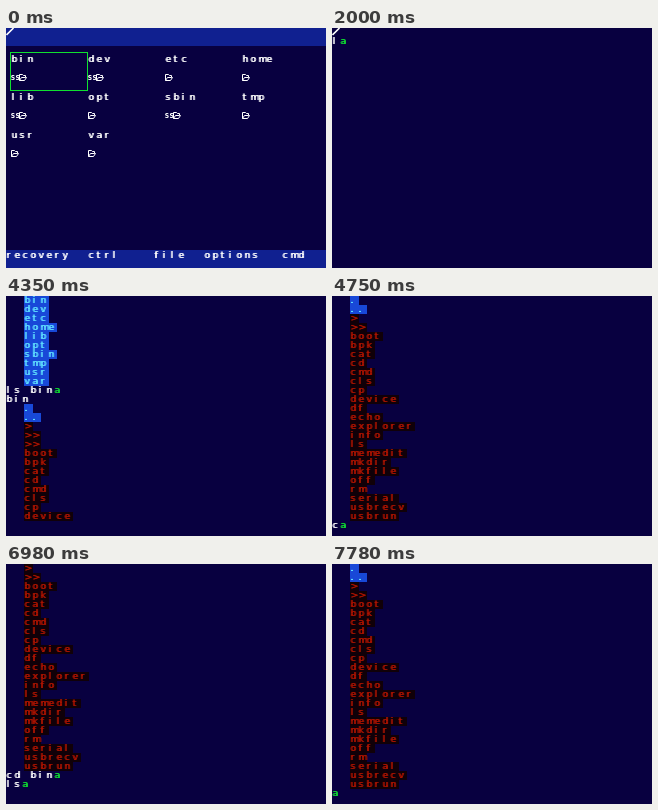
These frames come from a looping animation (320 px wide and 240 px high, 8000 ms). An HTML page with a canvas:

```html
<!DOCTYPE html>
<html lang="en">
<head>
<meta charset="utf-8">
<title>Shell session</title>
<style>
  html, body { margin: 0; width: 100%; height: 100%; overflow: hidden; background: #080040; }
  canvas { display: block; width: 100%; height: 100%; image-rendering: pixelated; }
</style>
</head>
<body>
<canvas id="screen" width="320" height="240"></canvas>
<script>
const ctx = document.getElementById("screen").getContext("2d");
const LOOP = 8000, CELL = 8, ROW = 9, ROWS = 26, TICK = 40;
const NAVY = "#080040", BAR = "#102090", WHITE = "#fff", GREEN = "#10e030";
const FOLDER = { ink: "#60e0ff", paper: "#1848d8" };
const PROGRAM = { ink: "#b01400", paper: "#100008" };

const rootDirs = "bin dev etc home lib opt sbin tmp usr var".split(" ");
const programs = ("> >> boot bpk cat cd cmd cls cp device df echo explorer info ls " +
  "memedit mkdir mkfile off rm serial usbrecv usbrun").split(" ");
const folders = names => names.map(text => ({ text, ...FOLDER }));
const binListing = [...folders([".", ".."]), ...programs.map(text => ({ text, ...PROGRAM }))];

// Everything the terminal ever prints, one entry per row.
const lines = [{ text: "", at: 0 }];
function prompt(at, text, keys) {
  lines.push({ text, at, keys });
}
function output(path, entries, appearsAt) {
  [{ text: path }, ...entries].forEach((line, k) => lines.push({ ...line, at: appearsAt(k) }));
}
prompt(540, "ls", [2000, 2180]);
output("/", folders([".", ...rootDirs]), k => 2360 + TICK * Math.max(0, Math.ceil((k - 2) / 4)));
prompt(2480, "ls bin", [2950, 3130, 3220, 3640, 3730, 3910]);
output("bin", binListing, k => k > 4 ? 4230 : 4190);
prompt(4750, "cd bin", [4750, 5220, 5400, 5730, 5820, 5960]);
prompt(6280, "ls", [6750, 6840]);
output("/bin/", binListing, () => 6980);
prompt(7780, "", []);

// Rows scrolled so far; the fraction is a redraw still moving down the screen.
function scrolledRows(t) {
  const since = start => Math.floor((t - start) / TICK) * TICK;
  if (t < 4190) return 0;
  if (t < 4750) return Math.min(16, Math.max(0, (since(4190) - 48.5) / 30.8));
  if (t < 6240) return 16;
  if (t < 6980) return 17;
  return Math.min(44, 18 + since(6980) * 26 / 800);
}

function fill(color, x, y, w, h) {
  ctx.fillStyle = color;
  ctx.fillRect(x, y, w, h);
}

// Each letter is struck twice, one pixel apart, for thick uprights and thin bars.
function write(text, x, y, color = WHITE) {
  ctx.font = '9.4px "DejaVu Sans", sans-serif';
  ctx.fillStyle = color;
  [...text].forEach((char, i) => {
    const left = x + i * CELL;
    ctx.fillText(char, left, y + 7);
    ctx.fillText(char, left + 1, y + 7);
  });
}

function stroke(path, x, y, width = 1) {
  ctx.save();
  ctx.translate(x, y);
  ctx.strokeStyle = WHITE;
  ctx.lineWidth = width;
  ctx.stroke(new Path2D(path));
  ctx.restore();
}

const drawPointer = () => stroke("M.5 7L7.5 0", 0, 0, 1.6);

function drawExplorer() {
  fill(BAR, 0, 0, 320, 18);
  fill(BAR, 0, 222, 320, 18);
  rootDirs.forEach((name, i) => {
    const x = 5 + i % 4 * 77, y = 27 + Math.floor(i / 4) * 38;
    const system = ["bin", "dev", "lib", "sbin"].includes(name);
    write(name, x, y);
    if (system) {
      ctx.font = 'bold 8px "DejaVu Sans Mono", monospace';
      ctx.fillText("ss", x - 0.5, y + 25);
    }
    stroke("M.5 6.5V.5H3.5L4.5 1.5H6.5V3.5H2.5L.5 6.5H5.5L7.5 3.5H6.5", x + (system ? 8 : 0), y + 19);
  });
  ctx.strokeStyle = GREEN;
  ctx.lineWidth = 1;
  ctx.strokeRect(4.5, 24.5, 77, 38);
  [["recovery", 0], ["ctrl", 82], ["file", 148], ["options", 198], ["cmd", 276]]
    .forEach(([label, x]) => write(label, x, 223));
  drawPointer();
}

function drawLine(line, y, t) {
  if (line.keys) {
    const typed = line.keys.filter(key => key <= t).length;
    write(line.text.slice(0, typed), 0, y);
    write("a", typed * CELL, y, GREEN);
  } else if (line.paper) {
    fill(line.paper, 18, y, line.text.length * CELL + 1, ROW);
    write(line.text, 18, y, line.ink);
  } else {
    write(line.text, 0, y);
  }
}

function drawTerminal(t) {
  const scroll = scrolledRows(t), whole = Math.floor(scroll);
  const tear = Math.round((scroll - whole) * ROWS);
  for (let row = 0; row < ROWS; row++) {
    const line = lines[row + whole + (row < tear ? 1 : 0)];
    const hidden = !line || line.at > t || (row === ROWS - 1 && !line.keys);
    if (!hidden) drawLine(line, row * ROW, t);
  }
  if (scroll === 0) drawPointer();
}

function draw() {
  const t = performance.now() % LOOP;
  fill(NAVY, 0, 0, 320, 240);
  if (t < 500) drawExplorer();
  else drawTerminal(t);
  requestAnimationFrame(draw);
}
draw();
</script>
</body>
</html>
```
